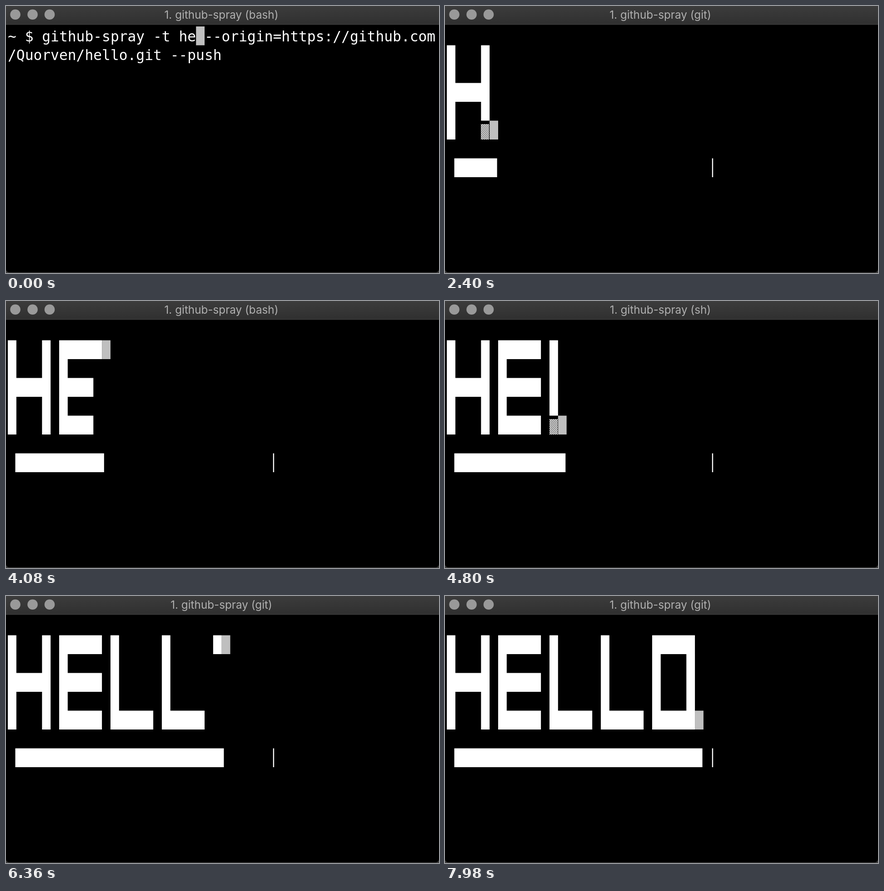
Write an HTML page with a canvas that moves like this. It is 953 px wide and 588 px high and loops after 8 s.

```html
<!DOCTYPE html>
<html lang="en">
<head>
<meta charset="utf-8">
<title>Terminal</title>
<style>
  html, body { margin: 0; width: 100%; height: 100%; overflow: hidden; background: #3a3a3a; }
  svg, canvas { position: absolute; left: 0; top: 0; width: 953px; height: 588px; }
  text { white-space: pre; }
  .title { font: 24.25px Inter, Roboto, sans-serif; fill: #b0b0b0; text-anchor: middle; }
  .line { font: 31.28px "DejaVu Sans Mono", monospace; fill: #fff; }
</style>
</head>
<body>
<svg viewBox="0 0 953 588">
  <defs>
    <linearGradient id="bar" x1="0" y1="0" x2="0" y2="1">
      <stop offset="0" stop-color="#3c3c3c"/>
      <stop offset="1" stop-color="#303030"/>
    </linearGradient>
  </defs>
  <rect y="30" width="953" height="556.5" rx="7"/>
  <rect width="953" height="40" fill="url(#bar)"/>
  <rect y="40" width="953" height="1.2" fill="#434343"/>
  <g fill="#999">
    <circle cx="20.5" cy="18.8" r="11.3"/>
    <circle cx="58.5" cy="18.8" r="11.3"/>
    <circle cx="96" cy="18.8" r="11.3"/>
  </g>
  <text class="title" x="474" y="28"></text>
  <text class="line" x="4" y="77.5"></text>
  <text class="line" x="4" y="119"></text>
</svg>
<canvas width="953" height="588"></canvas>
<script>
const LOOP = 8000, TICK = 30;
const COLS = 50, LEFT = 4, TOP = 45, CELL_W = 18.83, CELL_H = 41.5;
const ENTER = 840, CLEAR = 990;

const ctx = document.querySelector('canvas').getContext('2d');
const title = document.querySelector('.title');
const lines = document.querySelectorAll('.line');

const keys = [[0, 'he'], [330, 'hel'], [450, 'hell'], [630, 'hello']];
const jobs = [[0, 'bash'], [1590, 'sh'], [2100, 'git'], [3750, 'bash'],
              [4350, 'sh'], [5250, 'git'], [7200, 'bash'], [7710, 'git']];
// Time against number of finished cells.
const pace = [[CLEAR, 0], [1500, 4.6], [3330, 21.1], [4800, 34.6],
              [5730, 43.1], [7020, 55.1], [7980, 63.85]];

const glyphs = {
  H: ['#...#', '#...#', '#####', '#...#', '#...#'],
  E: ['#####', '#....', '#####', '#....', '#####'],
  L: ['#....', '#....', '#....', '#....', '#####'],
  O: ['#####', '#...#', '#...#', '#...#', '#####']
};

// Cells in painting order: down each column, left to right.
const cells = [];
[...'HELLO'].forEach((letter, i) => {
  for (let x = 0; x < 5; x++)
    for (let y = 0; y < 5; y++)
      if (glyphs[letter][y][x] === '#') cells.push({ col: i * 6 + x, row: y });
});

// Staggered dots of the given size, or holes of that size in white.
function dotPattern(size, holes) {
  const tile = document.createElement('canvas');
  tile.width = tile.height = 4;
  const tileCtx = tile.getContext('2d');
  tileCtx.fillStyle = '#fff';
  if (holes) {
    tileCtx.fillRect(0, 0, 4, 4);
    tileCtx.fillStyle = '#000';
  }
  tileCtx.fillRect(0, 1, size, size);
  tileCtx.fillRect(2, 3 - 2 * (size > 1), size, size);
  if (size > 1) {
    tileCtx.clearRect(0, 0, 4, 4);
    tileCtx.fillStyle = '#fff';
    if (holes) tileCtx.fillRect(0, 0, 4, 4);
    tileCtx.fillStyle = holes ? '#000' : '#fff';
    tileCtx.fillRect(0, 0, size, size);
    tileCtx.fillRect(2, 2, size, size);
  }
  return ctx.createPattern(tile, 'repeat');
}
const shades = [dotPattern(1), dotPattern(2), dotPattern(1.6, true)];

const colX = col => LEFT + col * CELL_W;
const rowY = row => TOP + row * CELL_H;
const latest = (list, t) => list.filter(([at]) => at <= t).pop()[1];

function progress(t) {
  let i = 1;
  while (i < pace.length - 1 && t > pace[i][0]) i++;
  const [t0, p0] = pace[i - 1], [t1, p1] = pace[i];
  return Math.min(p0 + (p1 - p0) * (t - t0) / (t1 - t0), cells.length - 0.01);
}

function drawCursor(col, row) {
  ctx.fillStyle = '#bfbfbf';
  ctx.fillRect(colX(col), rowY(row), CELL_W, CELL_H);
}

function drawPrompt(t) {
  const head = '~ $ github-spray -t ' + latest(keys, t);
  const text = head + ' --origin=https://github.com/Quorven/hello.git --push';
  lines[0].textContent = text.slice(0, COLS);
  lines[1].textContent = text.slice(COLS);
  if (t < ENTER) drawCursor(head.length, 0);
  else drawCursor(0, 2);
}

function drawSpray(t) {
  lines.forEach(line => line.textContent = '');
  const position = progress(t), index = Math.floor(position);
  const level = Math.floor((position - index) * 4);
  const { col, row } = cells[index];

  // One path keeps neighbouring cells free of seams.
  ctx.fillStyle = '#fff';
  ctx.beginPath();
  for (const c of cells.slice(0, level === 3 ? index + 1 : index))
    ctx.rect(colX(c.col), rowY(c.row + 1), CELL_W, CELL_H);
  ctx.fill();

  if (level < 3) {
    ctx.fillStyle = shades[level];
    ctx.fillRect(Math.round(colX(col)), Math.round(rowY(row + 1)) + 7, 18, 34);
  }
  drawCursor(col + 1, row + 1);

  // The bar advances in eighths of a cell, one column per seven-day week.
  const eighths = Math.round((row + 2) / 7 * 8);
  const edge = CELL_W / 8, start = colX(1) - edge;
  ctx.fillStyle = '#fff';
  ctx.fillRect(start, rowY(7), colX(1 + col + eighths / 8) - start, CELL_H);
  ctx.fillRect(colX(31), rowY(7), edge, CELL_H);
}

const begin = performance.now();
function frame() {
  const t = Math.floor((performance.now() - begin) % LOOP / TICK) * TICK;
  ctx.clearRect(0, 0, 953, 588);
  title.textContent = `1. github-spray (${latest(jobs, t)})`;
  if (t < CLEAR) drawPrompt(t);
  else drawSpray(t);
  requestAnimationFrame(frame);
}
frame();
</script>
</body>
</html>
```
